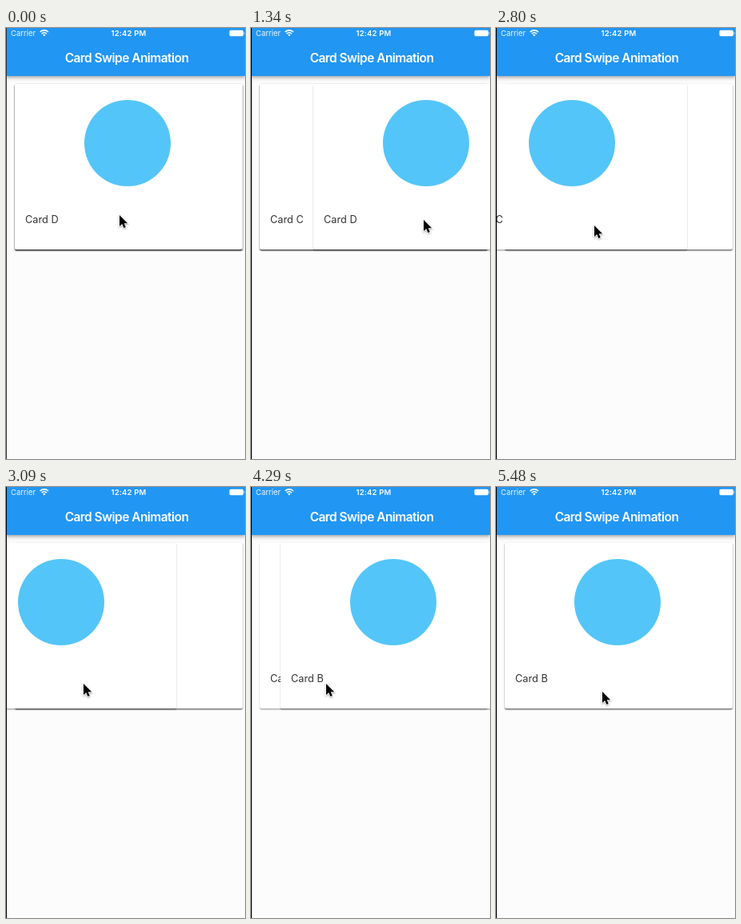
An HTML page that plays this animation: 299 by 539 pixels, repeating every 5630 ms.

```html
<!DOCTYPE html>
<html lang="en">
<head>
<meta charset="utf-8">
<title>Card Swipe Animation</title>
<style>
  html, body { margin: 0; width: 100%; height: 100%; overflow: hidden; }
  body { position: relative; background: #fcfcfc; font-family: Inter, "Open Sans", sans-serif; }

  #stage { position: absolute; left: 0; top: 0; width: 299px; height: 539px; overflow: hidden; }

  header {
    position: absolute; inset: 0 0 auto; height: 60px;
    background: #2196f3; color: #fff;
    box-shadow: 0 1.6px 3px -.8px rgba(0,0,0,.2), 0 3px 4px rgba(0,0,0,.14), 0 1px 8px rgba(0,0,0,.12);
  }
  header span { position: absolute; white-space: nowrap; line-height: 12px; font-size: 9.5px; }
  .carrier { left: 6px; top: 1px; opacity: .92; }
  .clock { left: 8px; right: 0; top: 1px; text-align: center; font-weight: 600; letter-spacing: .2px; }
  header .title {
    left: 3px; right: 0; top: 28px; line-height: 20px; text-align: center;
    font-size: 15.5px; font-weight: 600; letter-spacing: -.55px;
  }
  header svg { position: absolute; left: 0; top: 0; }

  .card {
    position: absolute; left: 11px; top: 70px; width: 284.5px; height: 207px;
    background: #fff; border-radius: 2px;
    box-shadow: 0 1.4px 1.4px rgba(0,0,0,.26), 0 .5px 1.4px rgba(0,0,0,.18);
  }
  .card::before {
    content: ""; position: absolute; left: 86.5px; top: 20px;
    width: 108px; height: 108px; border-radius: 50%; background: #54c5f8;
  }
  .card span {
    position: absolute; left: 13px; top: 162px;
    font-size: 12.75px; line-height: 16px; color: #333; white-space: nowrap;
  }

  #edge { position: absolute; left: 0; top: 0; width: 1px; height: 100%; background: #000; }
  #cursor { position: absolute; left: -2px; top: -2px; overflow: visible; filter: drop-shadow(0 1px 1px rgba(0,0,0,.35)); }
</style>
</head>
<body>
<div id="stage">
  <header>
    <span class="carrier">Carrier</span>
    <span class="clock">12:42 PM</span>
    <span class="title">Card Swipe Animation</span>
    <svg width="299" height="14" fill="none" stroke="#fff">
      <path d="M42.6 5a7.4 7.4 0 0 1 10.4 0M44.6 7.2a4.6 4.6 0 0 1 6.4 0" stroke-width="1.6"/>
      <path d="M46 8.6a2.6 2.6 0 0 1 3.6 0L47.8 10.5z" fill="#fff" stroke="none"/>
      <rect x="279.5" y="2.8" width="17.5" height="7.4" rx="1.6" fill="#fff" stroke="none"/>
      <path d="M298 5v3" opacity=".6"/>
    </svg>
  </header>
  <div id="deck"></div>
  <div id="edge"></div>
  <svg id="cursor" width="16" height="22" viewBox="-2 -2 16 22">
    <path d="M0 0V14L3.2 11L5.4 16L7.8 15L5.7 10.2H10.2Z" fill="#000" stroke="#fff" stroke-width="1.6" paint-order="stroke"/>
  </svg>
</div>
<script>
const LOOP = 5630, STEPS = 38;   // the picture moves on about every 150 ms
const LEAD = 20;                 // keeps the even steps just ahead of the uneven ones
const SLOP = 7;                  // pointer travel before a card follows

const easeIn = k => p => p ** k;
const easeOut = k => p => 1 - (1 - p) ** k;

// Pointer strokes in steps; each begins where the previous one ended.
const home = { x: 142, y: 234 };
const strokes = [
  { from: 6, to: 11, x: 302, y: 247, ease: easeIn(1.5), action: 'dismiss' },
  { from: 13, to: 15, x: 187, y: 247, ease: easeOut(3) },
  { from: 16, to: 23, x: 11, y: 246, ease: easeIn(1.2), action: 'dismiss' },
  { from: 25, to: 27, x: 61, y: 244, ease: easeOut(1) },
  { from: 28, to: 34, x: 128, y: 248, ease: easeOut(3.7), action: 'return' },
  { from: 36, to: 37, x: 133, y: 256, ease: easeOut(1) }
];

const byId = id => document.getElementById(id);
const clamp = v => Math.min(1, Math.max(0, v));
const deck = byId('deck'), cursor = byId('cursor'), edge = byId('edge');

// The last card added lies on top.
const cards = [...'ABCD'].map(letter => {
  const card = document.createElement('div');
  card.className = 'card';
  card.innerHTML = `<span>Card ${letter}</span>`;
  return deck.appendChild(card);
}).reverse();

function poseAt(step) {
  let { x, y } = home, drag = 0, top = 0;
  for (const s of strokes) {
    if (step <= s.from) break;
    const p = s.ease(clamp((step - s.from) / (s.to - s.from)));
    const dx = (s.x - x) * p;
    const pull = dx - Math.sign(dx) * Math.min(SLOP, Math.abs(dx));
    drag = 0;
    if (s.action === 'dismiss') {
      if (step > s.to) top++;
      else drag = pull;
    } else if (s.action === 'return') {
      drag = pull * clamp((s.to + 1 - step) / 2);
    }
    x += dx;
    y += (s.y - y) * p;
  }
  return { x, y, drag, top };
}

function draw(t) {
  const step = Math.floor((t + LEAD) / LOOP * STEPS) % STEPS;
  const { x, y, drag, top } = poseAt(step);
  cards.forEach((card, i) => {
    card.style.visibility = i < top ? 'hidden' : 'visible';
    card.style.transform = i === top && drag ? `translateX(${Math.round(drag)}px)` : 'none';
  });
  cursor.style.transform = `translate(${Math.round(x)}px, ${Math.round(y)}px)`;
  edge.style.background = step < 5 ? '#333' : '#000';
}

const start = performance.now();
function tick() {
  draw((performance.now() - start) % LOOP);
  requestAnimationFrame(tick);
}
tick();
</script>
</body>
</html>
```
